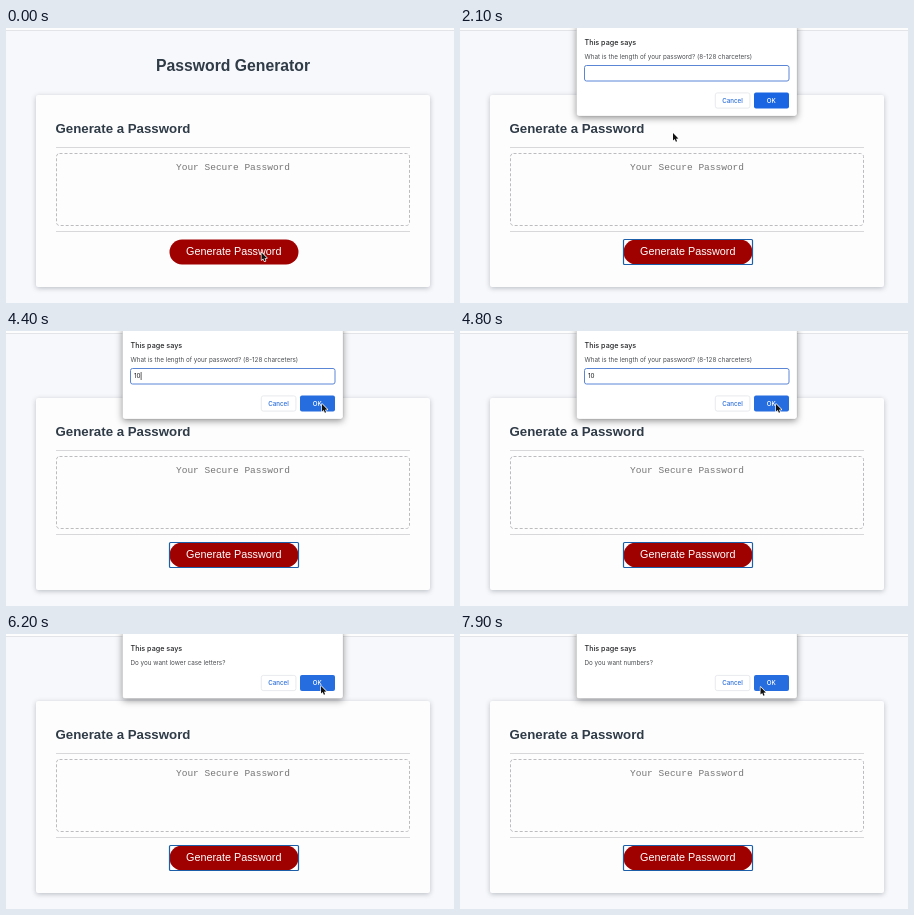
An HTML page with a canvas for the animation above (8000 ms loop, 448 by 275 pixels).

```html
<!DOCTYPE html>
<html lang="en">
<head>
<meta charset="utf-8">
<title>Password Generator</title>
<style>
html, body { margin: 0; width: 100%; height: 100%; overflow: hidden; background: #f7f8fb; }
canvas { display: block; width: 448px; height: 275px; }
</style>
</head>
<body>
<canvas id="stage"></canvas>
<script>
const W = 448, H = 275, LOOP = 8000, STEP = 100;
const SANS = '"Liberation Sans", Arial, sans-serif';
const MONO = '"Liberation Mono", "Courier New", monospace';
const UI = 'Inter, Roboto, sans-serif';

const canvas = document.getElementById('stage');
const ratio = window.devicePixelRatio || 1;
canvas.width = W * ratio;
canvas.height = H * ratio;
const ctx = canvas.getContext('2d');
ctx.scale(ratio, ratio);

// Pointer tip: time, x, y
const pointerPath = [
  [0, 255.5, 224.5], [800, 255.5, 224.5], [1100, 233, 162], [1300, 229, 150],
  [1900, 213, 105], [2600, 213, 105], [2900, 211.5, 102], [3800, 211.5, 102],
  [4400, 316, 73], [5400, 316, 73], [5500, 315.3, 64.5], [5800, 315, 53],
  [6000, 315, 52], [6800, 315, 52], [7200, 300.5, 53], [8000, 300.5, 53]
];

const dialogs = [
  { start: 500, end: 4900, prompt: true, message: 'What is the length of your password? (8-128 charceters)' },
  { start: 4900, end: 6300, message: 'Do you want lower case letters?' },
  { start: 6300, end: 7500, message: 'Do you want upper case letters?' },
  { start: 7500, end: LOOP, message: 'Do you want numbers?' }
];

function fillRect(x, y, w, h, color) {
  ctx.fillStyle = color;
  ctx.fillRect(x, y, w, h);
}

function roundRect(x, y, w, h, r, fill, stroke, lineWidth = 1) {
  ctx.beginPath();
  ctx.roundRect(x, y, w, h, r);
  if (fill) { ctx.fillStyle = fill; ctx.fill(); }
  if (stroke) { ctx.strokeStyle = stroke; ctx.lineWidth = lineWidth; ctx.stroke(); }
}

function shadowed(color, blur, dy, draw) {
  ctx.save();
  ctx.shadowColor = color;
  ctx.shadowBlur = blur * ratio;
  ctx.shadowOffsetY = dy * ratio;
  draw();
  ctx.restore();
}

function text(str, x, y, font, color, align = 'left') {
  ctx.font = font;
  ctx.fillStyle = color;
  ctx.textAlign = align;
  ctx.fillText(str, x, y);
}

function pointerAt(t) {
  const i = pointerPath.findIndex(key => key[0] > t);
  const [t0, x0, y0] = pointerPath[i - 1];
  const [t1, x1, y1] = pointerPath[i];
  const k = (t - t0) / (t1 - t0);
  const ease = k * k * (3 - 2 * k);
  return [x0 + (x1 - x0) * ease, y0 + (y1 - y0) * ease];
}

function drawPage(focused) {
  fillRect(0, 0, W, H, '#f7f8fb');
  fillRect(0, 0, W, 2, '#fdfdfe');
  fillRect(0, 2, W, 1, '#e2e4e8');
  text('Password Generator', 227, 43, `bold 15.75px ${SANS}`, '#2f3b47', 'center');

  shadowed('rgba(60,70,90,0.32)', 5, 1.2, () => roundRect(30, 67, 394, 192, 2, '#fdfdfe'));
  text('Generate a Password', 49.5, 105, `bold 13.27px ${SANS}`, '#2f3b47');
  fillRect(50, 119, 354, 1, '#d8d8da');
  fillRect(50, 203, 354, 1, '#d8d8da');

  ctx.setLineDash([3, 2]);
  roundRect(50.5, 125.5, 353, 72, 3, null, '#bcbcbe');
  ctx.setLineDash([]);
  text('Your Secure Password', 227, 142, `9.5px ${MONO}`, '#757575', 'center');

  roundRect(163.5, 211.5, 129, 25, 12.5, '#9f0000');
  text('Generate Password', 227.7, 227.4, `10.8px ${SANS}`, '#ffffff', 'center');
  if (focused) roundRect(163.5, 211.5, 129, 25, 1, null, '#1c5fa8', 1.2);
}

function drawInput(t) {
  roundRect(124.5, 37.5, 204.5, 15.5, 2, '#ffffff', '#5b86d6');
  const typed = t < 3100 ? '' : t < 3300 ? '1' : '10';
  text(typed, 128, 47.3, `6.3px ${UI}`, '#202124');
  // The blink restarts with the last key press.
  const since = t < 3300 ? t - 600 : t - 3300;
  if (since >= 0 && since % 1000 < 500) {
    const width = typed ? ctx.measureText(typed).width : 0;
    fillRect(128.2 + width, 41, 0.7, 8, '#202124');
  }
}

function drawDialog(dialog, t, [px, py]) {
  const height = dialog.prompt ? 88 : 64.5;
  const top = height - 23.5;
  const hover = px >= 294 && px <= 329 && py >= top && py <= top + 16;

  ctx.globalAlpha = t - dialog.start < STEP ? 0.8 : 1;
  shadowed('rgba(0,0,0,0.42)', 7, 2, () => roundRect(116.5, -4, 220.5, height + 4, 2.5, '#ffffff'));
  roundRect(116.5, -4, 220.5, height + 4, 2.5, null, 'rgba(0,0,0,0.14)', 0.5);
  text('This page says', 124.5, 16.8, `500 7.2px ${UI}`, '#202124');
  text(dialog.message, 124.5, 31, `6.3px ${UI}`, '#4a4d51');
  if (dialog.prompt) drawInput(t);

  roundRect(255.3, top + 0.4, 34.6, 15.2, 2, '#ffffff', '#dfe1e5', 0.7);
  roundRect(294, top, 35, 16, 2, hover ? '#266de0' : '#1a66e2');
  text('Cancel', 272.5, top + 10.2, `500 6.2px ${UI}`, '#2a6edb', 'center');
  text('OK', 311.3, top + 10.2, `500 6.2px ${UI}`, '#ffffff', 'center');
  ctx.globalAlpha = 1;
}

function drawPointer([x, y]) {
  ctx.save();
  ctx.translate(x, y);
  ctx.beginPath();
  [[0, 0], [0, 7.6], [1.7, 6.1], [2.9, 8.8], [4.1, 8.3], [3, 5.7], [5.4, 5.5]]
    .forEach(([dx, dy]) => ctx.lineTo(dx, dy));
  ctx.closePath();
  ctx.lineJoin = 'round';
  ctx.lineWidth = 1.3;
  ctx.strokeStyle = '#ffffff';
  ctx.stroke();
  ctx.fillStyle = '#111111';
  ctx.fill();
  ctx.restore();
}

function render(t) {
  const pointer = pointerAt(t);
  drawPage(t >= 400);
  const dialog = dialogs.find(d => t >= d.start && t < d.end);
  if (dialog) drawDialog(dialog, t, pointer);
  drawPointer(pointer);
}

const start = performance.now();
function tick() {
  const elapsed = (performance.now() - start) % LOOP;
  render(Math.floor(elapsed / STEP) * STEP);
  requestAnimationFrame(tick);
}
tick();
</script>
</body>
</html>
```
